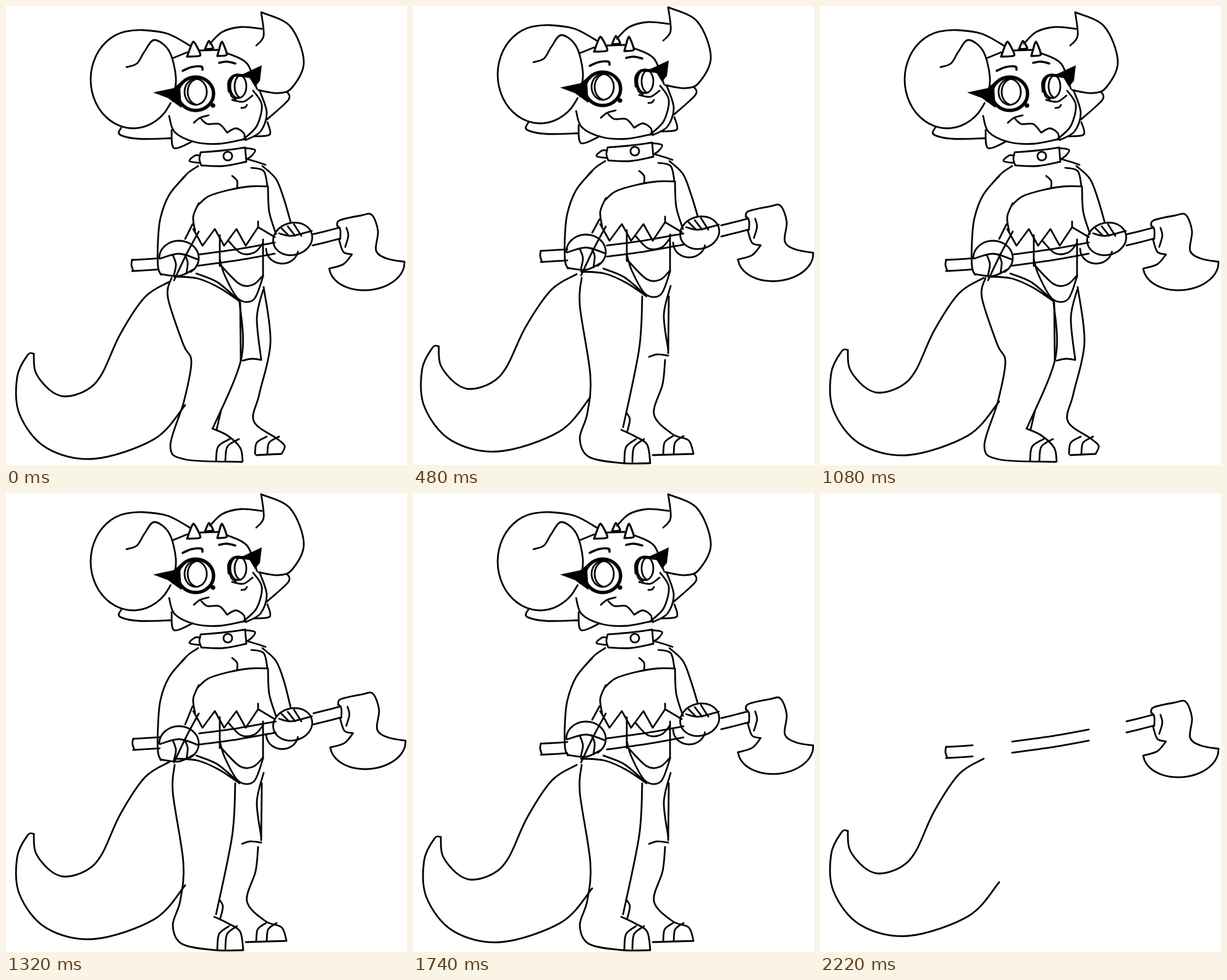
Recreate the animation shown at these times as an HTML page with a canvas. Size 649 px wide and 743 px high, loop 2280 ms.

```html
<!DOCTYPE html>
<html lang="en">
<head>
<meta charset="utf-8">
<title>Idle bounce</title>
<style>
html, body { margin: 0; width: 100%; height: 100%; overflow: hidden; background: #fff; }
canvas { display: block; }
</style>
</head>
<body>
<canvas id="stage" width="649" height="743"></canvas>
<script>
const ctx = document.getElementById('stage').getContext('2d');
const STEP = 60, COUNT = 38, BODY_COUNT = 36, TURN = Math.PI * 2;

const points = s => s.split(' ').map(p => p.split(',').map(Number));
const join = (...parts) => parts.flatMap(p => typeof p === 'string' ? points(p) : p);

// Points on an ellipse, with the angles given in turns.
function ring(cx, cy, rx, ry, from = 0, to = 1, tilt = 0) {
  const n = Math.ceil(Math.abs(to - from) * 24);
  const c = Math.cos(tilt * TURN), s = Math.sin(tilt * TURN);
  return Array.from({ length: n + 1 }, (_, i) => {
    const a = (from + (to - from) * i / n) * TURN;
    const x = rx * Math.cos(a), y = ry * Math.sin(a);
    return [cx + x * c - y * s, cy + x * s + y * c];
  });
}

// Smooth curve through the points; a repeated point makes a corner.
function trace(p) {
  ctx.beginPath();
  ctx.moveTo(...p[0]);
  for (let i = 0; i < p.length - 1; i++) {
    const a = p[i - 1] || p[i], b = p[i], c = p[i + 1], d = p[i + 2] || c;
    if (b[0] === c[0] && b[1] === c[1]) continue;
    ctx.bezierCurveTo(
      b[0] + (c[0] - a[0]) / 6, b[1] + (c[1] - a[1]) / 6,
      c[0] - (d[0] - b[0]) / 6, c[1] - (d[1] - b[1]) / 6, c[0], c[1]);
  }
}

function ink(width, ...lines) {
  ctx.lineWidth = width;
  for (const line of lines) {
    trace(join(line));
    ctx.stroke();
  }
}

const draw = (...lines) => ink(2.8, ...lines);

// Straight-edged outline, optionally filled.
function poly(s, filled) {
  ctx.beginPath();
  for (const p of points(s)) ctx.lineTo(...p);
  if (filled) ctx.fill();
  else ctx.stroke();
}

function shifted(x, y, paint) {
  ctx.save();
  ctx.translate(x, y);
  paint();
  ctx.restore();
}

function spike(x, w, base, h) {
  ink(3.2, [[x, base], [x + w * 0.4, base - h], [x + w * 0.6, base - h],
    [x + w, base - h * 0.25], [x + w * 0.9, base - 1], [x, base]]);
}

function head() {
  draw(
    // horns
    join(ring(206, 111, 69, 79, 0.08, 0.72), '222,31 262,37 299,57'),
    '270,146 275,108 264,65 240,47 224,66 212,85 195,91',
    '330,53 350,34 380,26 414,29',
    '405,56 417,40 413,2 413,2 460,25 482,82 463,124 440,133 408,128',
    // skull, cheek and jaw
    '271,76 293,67', '314,64 342,63', '357,68 390,85 406,126',
    '400,129 414,152 406,186 385,207', '411,130 422,165 412,195 388,209',
    '264,170 273,196 305,212 345,215 388,207',
    // ears
    '455,131 457,144 422,176', '423,180 427,200 402,203',
    '187,188 184,200 215,207 268,206', '268,193 272,222 302,211',
    // mouth and nose
    '304,181 314,173 328,169',
    '316,175 326,183 345,183 358,197 358,197 372,190 385,198 386,208',
    '381,157 387,156 390,152');
  spike(293, 21, 74, 22);
  spike(322, 13, 62, 12);
  spike(342, 15, 73, 21);
  ink(3.6, '286,97 300,91 316,90 318,95', '345,84 357,82 371,85');
}

function openEyes() {
  ink(5.5, ring(307, 134, 29, 27));
  poly('238,132 271,125 290,109 282,124 284,157 262,141', true);
  ink(4.5, '361,130 361,114 372,104 398,107', ring(335, 153, 1.5, 1.5));
  poly('414,88 411,113 403,123 394,108 372,106 386,101', true);
  draw(ring(307, 131, 18, 21), ring(311, 131, 17, 21, 0.3, 0.7),
    ring(376, 122, 13, 19), ring(382, 122, 12, 19, 0.3, 0.7),
    '361,126 365,138 372,143', '366,144 384,147 399,137');
}

function lowEyes() {
  poly('231,136 265,138 339,137 339,143 285,143 291,156 255,144', true);
  ink(4, '337,140 335,153', '362,135 382,137 399,130');
  draw('285,150 305,161 334,154', ring(309, 143, 17, 13, 0, 0.5),
    ring(311, 143, 11, 7, 0, 0.5), ring(380, 139, 9, 3, 0, 0.5));
}

function collar() {
  draw('315,229 350,226 387,221 387,221 389,244 389,244 352,251 316,250 316,250 313,240 315,229',
    '314,234 306,234 297,243 314,246', '387,222 403,225 398,234 390,240',
    ring(359, 235, 7, 7));
}

function hem() {
  const teeth = [];
  for (let x = 303; x < 400; x += 35) teeth.push([x, 353], [x + 15, 380]);
  ctx.beginPath();
  teeth.concat([[408, 350], [435, 366]]).forEach(p => ctx.lineTo(...p));
  ctx.stroke();
}

function torso() {
  draw(
    '311,251 296,261 284,273', '391,240 405,244 420,249',
    '366,267 374,275 374,286', '397,254 417,259 423,283',
    '310,315 328,300 360,290 395,284 424,284 424,284 426,325 437,361',
    '312,311 303,333 306,356', '408,341 408,349',
    '346,363 346,413', '416,370 416,430',
    // belt and hips
    '360,372 380,392 402,391 416,376',
    '346,402 354,428 376,466 401,467 416,430',
    '346,410 378,442 400,443 416,428',
    '272,430 310,433 345,448 378,470', '308,425 342,439 376,468',
    '312,357 292,394 272,436');
  hem();
}

function arms(bodyY, handY) {
  const limb = (top, bottom) => [
    ...points(top).map(([x, y]) => [x, y + bodyY]),
    ...points(bottom).map(([x, y]) => [x, y + handY])];
  draw(
    limb('290,267 264,298 250,335', '246,370 246,412 251,425'),
    limb('415,251 437,272 450,305', '461,341'),
    limb('302,345', '290,367'));
  shifted(0, handY, () => {
    draw(ring(280, 398, 32, 28, 0.5, 1.15), '304,416 280,427 250,424',
      '249,399 280,391 310,400', '270,393 275,408 272,425', '289,392 294,405 292,423',
      ring(464, 367, 32, 26, 0, 1, -0.04), '442,358 462,362 495,354',
      ring(447, 383, 26, 24, 0.03, 0.5));
    for (let x = 446; x < 470; x += 10) draw([[x, 350 - (x - 446) / 3], [x + 12, 362]]);
  });
}

function toes(x, y, w, h, gap) {
  for (const left of [x, x + gap])
    draw([[left, y], [left + w * 0.15, y - h * 0.65], [left + w, y - h]]);
}

function straightLegs() {
  draw(
    '273,440 270,485 287,598 282,660 270,700 285,730 340,740 383,740',
    '371,470 366,555 340,682', '337,686 360,697 379,710 384,740',
    '345,658 351,669 347,688',
    '408,573 404,612 390,661 420,693 446,703 454,725 454,725 388,727',
    '417,453 406,500 413,556', '414,470 413,562', '382,568 395,564 413,566');
  toes(342, 738, 19, 37, 13);
  toes(405, 725, 16, 29, 17);
}

function bentLegs() {
  draw(
    '268,440 262,472 287,548 300,576 288,640 266,712 290,734 382,738',
    '378,478 381,570 335,683', '334,684 358,695 379,715 383,737',
    '348,655 341,685',
    '417,455 428,545 410,628 401,672 438,700 451,712 446,725 446,725 405,727',
    '416,460 406,505 413,572', '379,480 380,574', '383,574 398,571 413,573');
  toes(340, 736, 22, 35, 15);
  toes(403, 725, 19, 28, 20);
}

function axe() {
  const top = x => 411 - 0.045 * (x - 204) - 0.00033 * (x - 204) ** 2;
  // the grip shows only outside and between the hands
  for (const [from, to] of [[204, 247], [311, 435], [496, 540]])
    for (const drop of [0, 18])
      draw([from, (from + to) / 2, to].map(x => [x, top(x) + drop]));
  draw('204,411 203,419 206,429',
    join('536,356 540,347 575,339 592,338 602,364 599,396 617,409 645,414 645,414',
      ring(584, 419, 61, 41, 0.04, 0.46, -0.014),
      '523,425 523,425 546,418 560,402 560,402 546,398 539,378'),
    '536,355 541,362 541,377', '551,359 554,372 549,390');
}

// Swings left once at the start, then bobs in three levels.
function tail(n) {
  const intro = n < 9;
  const swing = intro ? 10 * Math.sin(n / 9 * Math.PI) : 0;
  const drop = intro ? 16 - 1.5 * n : 5 * Math.ceil(0.8 + Math.cos((n - 3) / 14 * TURN));
  const pose = ([x, y]) => [x - swing * Math.min(1, (y - 430) / 120), y + drop];
  draw(
    points('265,430 225,455 185,515 155,580 130,606 95,616 70,605 48,577 45,547').map(pose),
    points('45,547 35,549 18,585 22,645 65,699 142,717 240,685 290,630').map(pose));
}

const POSES = [
  { body: 8, hand: 10, axe: [0, 0], sway: 0, legs: bentLegs },
  { body: 0, hand: 7.5, axe: [1.7, -8.5], sway: 4.8, legs: straightLegs },
  { body: 0, hand: 0, axe: [2.8, -10], sway: 4.8, legs: straightLegs }
];

function scene(n) {
  ctx.fillStyle = '#fff';
  ctx.fillRect(0, 0, 649, 743);
  ctx.fillStyle = ctx.strokeStyle = '#000';
  ctx.lineCap = ctx.lineJoin = 'round';
  const shown = n < BODY_COUNT;
  const pose = POSES[shown ? n % 3 : 0];
  tail(n);
  if (shown) {
    shifted(0, pose.body, () => {
      head();
      n >= 10 && n <= 13 ? lowEyes() : openEyes();
      collar();
      torso();
    });
    pose.legs();
    arms(pose.body, pose.hand);
  }
  const [x, y] = pose.axe;
  shifted(x, y - pose.sway * Math.sin((n - 18) / 14 * TURN), axe);
}

const start = performance.now();
function tick() {
  scene(Math.floor((performance.now() - start) / STEP) % COUNT);
  requestAnimationFrame(tick);
}
tick();
</script>
</body>
</html>
```
